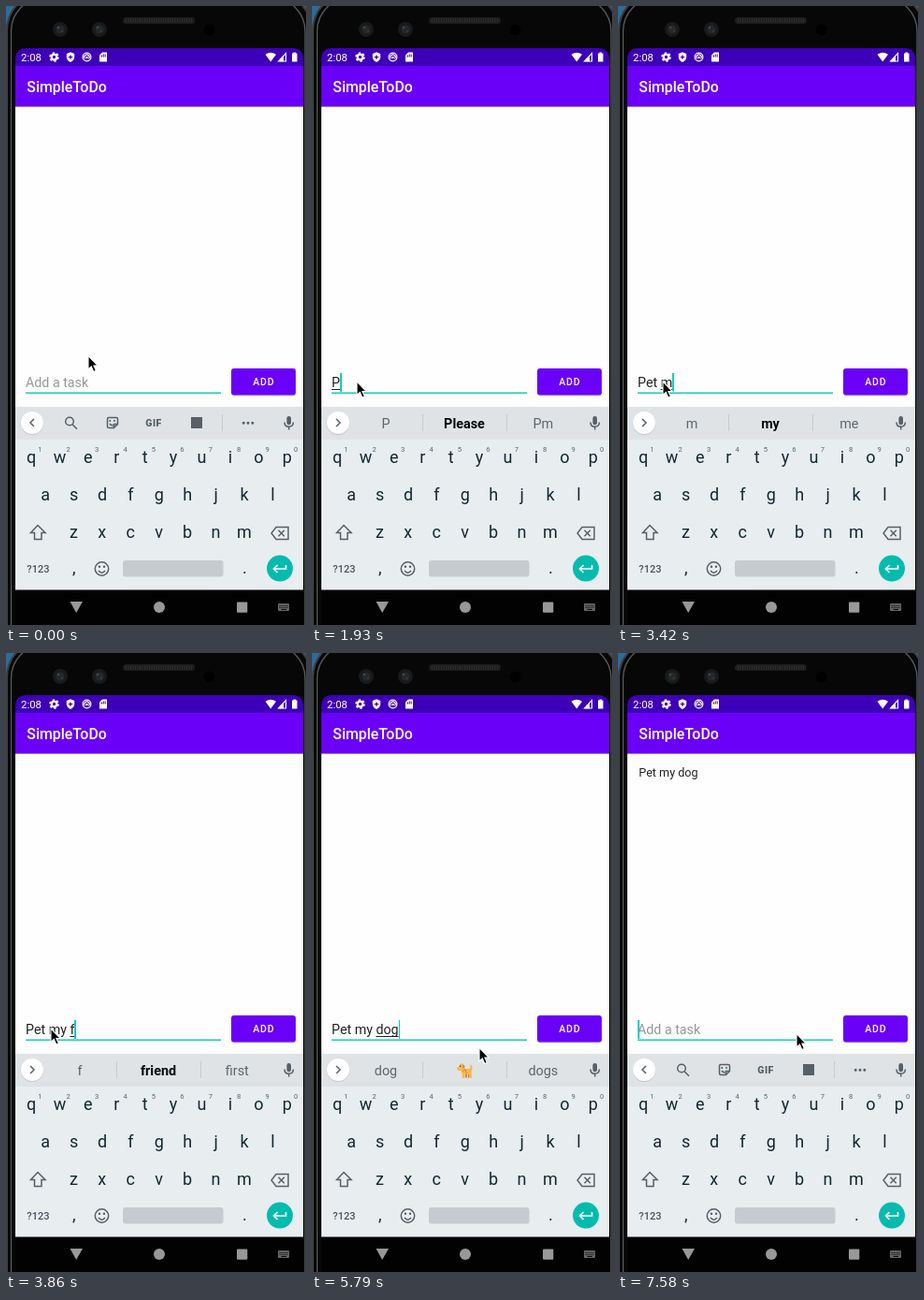
An HTML page that plays this animation: 321x661 px, repeating every 8000 ms.

```html
<!DOCTYPE html>
<html lang="en">
<head>
<meta charset="utf-8">
<title>To-do list demo</title>
<style>
html, body { margin: 0; width: 100%; height: 100%; overflow: hidden; background: #070707; }
#stage { position: absolute; left: 0; top: 0; width: 321px; height: 661px; overflow: hidden; font-family: Roboto, sans-serif; }
svg { position: absolute; left: 0; top: 0; }
.mid { text-anchor: middle; }
.key { font-size: 18px; fill: #12292f; }
.num { font-size: 7.6px; fill: #58646a; }
.tip { font-size: 14.4px; fill: #5d666b; }
.line { fill: none; stroke: #566066; stroke-width: 1.5; }
.solid { fill: #566066; }
.field { position: absolute; left: 21px; top: 394px; font-size: 14.25px; line-height: 16px; white-space: pre; color: #222; }
#hint { color: #979797; }
#word { text-decoration: underline 1px; text-underline-offset: 1.6px; text-decoration-skip-ink: none; }
#caret { position: absolute; top: -2px; width: 1.8px; height: 19.5px; background: #10cdbc; }
</style>
</head>
<body>
<div id="stage">
<svg width="321" height="661">
  <!-- phone body -->
  <rect width="14" height="30" fill="#2b6d98"/>
  <rect x="305" width="16" height="30" fill="#555a5d"/>
  <rect x="1" y="-14" width="326" height="720" rx="40" fill="#070707" stroke="#3d3e3f" stroke-width="2"/>
  <rect x="5.5" y="-9" width="314.500" height="720" rx="36" fill="none" stroke="#58595a" stroke-width="1.300"/>
  <rect x="125" y="12" width="77" height="7" rx="3.500" fill="#1d1d1d"/>
  <path d="M128 15.500H199" stroke="#303030" stroke-width="4" stroke-dasharray="1 1.500"/>
  <g id="lenses"></g>
  <circle cx="217.500" cy="25.500" r="6" fill="#000"/>

  <!-- app -->
  <path d="M10 64.500V57Q10 45 22 45H306Q318 45 318 57V64.500Z" fill="#3d00b8"/>
  <rect x="10" y="64" width="308" height="43.500" fill="#6a00f8"/>
  <rect x="10" y="107.500" width="308" height="320.500" fill="#fefefe"/>
  <g fill="#fff">
    <text x="16" y="58.800" font-size="11.400">2:08</text>
    <text x="22.300" y="92" font-size="15.900" font-weight="500">SimpleToDo</text>
    <g fill="none" stroke="#fff">
      <circle cx="51.500" cy="54.500" r="2.800" stroke-width="2.200"/>
      <circle cx="51.500" cy="54.500" r="4.500" stroke-width="1.600" stroke-dasharray="2.350 2.350"/>
      <circle cx="86.500" cy="54.500" r="4.400" stroke-width="1.200"/>
      <path d="M84.500 56.500A2.700 2.700 0 1 1 88.500 56.500" stroke-width="1.100"/>
    </g>
    <circle cx="86.500" cy="55" r="1.200"/>
    <path d="M69 49.200L73.200 51V54.500Q73 58 69 60Q65 58 64.800 54.500V51Z"/>
    <path d="M69 51.800L70 54L72 54.500L70 55.300L69 57.500L68 55.300L66 54.500L68 54Z" fill="#3d00b8"/>
    <path d="M103 49.500H108V59.500H100V52.500Z"/>
    <path d="M102.500 52.500V54.500M104.300 51.500V54.500M106.200 51.500V54.500" stroke="#3d00b8"/>
    <path d="M277.500 51.800Q283.200 47.600 289 51.800L283.200 59.500Z"/>
    <path d="M299.500 50.500V59H291.500Z" fill="none" stroke="#fff" stroke-width="1.100"/>
    <path d="M297 53V59.200H291.200Z"/>
    <path d="M306 50.500H307.500V49.500H310V50.500H311.500V59.500H306Z"/>
  </g>
  <text id="item" x="22.300" y="131.600" font-size="12.600" fill="#222">Pet my dog</text>
  <path d="M21 413.250H230" stroke="#18c9bc" stroke-width="1.500"/>
  <rect x="241" y="388" width="69" height="28.500" rx="3" fill="#000" opacity=".18"/>
  <rect id="button" x="241" y="387" width="69" height="28.500" rx="3"/>
  <text class="mid" x="275.900" y="405.200" font-size="10.500" font-weight="500" letter-spacing=".94" fill="#fff">ADD</text>

  <!-- keyboard -->
  <rect x="10" y="428" width="308" height="196" fill="#e8edf0"/>
  <rect x="10" y="428" width="308" height="35" fill="#dfe3e6"/>
  <circle cx="28" cy="445.800" r="12.300" fill="#000" opacity=".1"/>
  <circle cx="28" cy="445" r="12" fill="#fff"/>
  <path id="chevron" class="line" d="M30 441L26 445L30 449"/>
  <g id="tools">
    <circle class="line" cx="68" cy="443.500" r="4.300"/>
    <path class="line" d="M71 446.800L76 451.800"/>
    <path class="line" d="M110 439.500H118Q119.500 439.500 119.500 441V446.500L115.500 450.500H110Q108.500 450.500 108.500 449V441Q108.500 439.500 110 439.500M115.500 450V446.500H119M111 446Q112.500 448.300 114.500 447.500"/>
    <path class="line" d="M111.300 442V444M116 442V444"/>
    <text class="mid solid" x="158" y="449" font-size="10.500" font-weight="900" letter-spacing=".4">GIF</text>
    <rect class="solid" x="198" y="439" width="12" height="12"/>
    <path d="M231.500 436V454" stroke="#c6cbce"/>
    <path d="M254.200 445.300H265" stroke="#566066" stroke-width="3" stroke-linecap="round" stroke-dasharray="0 4.800"/>
  </g>
  <g id="tips">
    <path d="M118.500 436V454M208.500 436V454" stroke="#c6cbce"/>
    <text class="tip mid" x="79" y="451"></text>
    <text class="tip mid" x="163" y="451" style="fill:#080808;font-weight:700"></text>
    <text class="tip mid" x="247.300" y="451"></text>
    <g id="dog">
      <path d="M155 443L157.500 441L158.500 438.500H161.500L163 440.500V444H168.500Q170 442.500 169.500 439.500L171.300 440.500Q172 444 170.700 446V454H168.300V450H163.500V454H160.800V450L159.500 446H156Z" fill="#f6b850"/>
      <path d="M161 439.500L163.300 440.500V443.500L161.500 443ZM164 450H165.800V453.500H164ZM166.800 450H168.300V453.500H166.800Z" fill="#c98a3a"/>
      <path d="M161 447L164 444.500L165.500 449.500" fill="none" stroke="#dd7a44"/>
      <circle cx="158.700" cy="441.300" r=".7" fill="#36271f"/>
    </g>
  </g>
  <rect class="solid" x="300.400" y="438" width="4.600" height="9.200" rx="2.300"/>
  <path class="line" d="M298 444.500Q298 449.300 302.700 449.300T307.400 444.500M302.700 449V452.500"/>

  <g id="keys"></g>
  <path class="line" d="M34 554.500L42 562.500H38V569.500H30.500V562.500H26.500Z"/>
  <path class="line" d="M289 556.500H302V569.500H289L284 563ZM291.500 559.800L297.800 566.200M297.800 559.800L291.500 566.200"/>
  <text class="mid" x="34.400" y="604.800" font-size="11" font-weight="500" fill="#46545a">?123</text>
  <circle class="line" cx="102.500" cy="601" r="7.200"/>
  <path class="line" d="M99 603Q102.500 607.400 106 603"/>
  <circle class="solid" cx="100" cy="598.800" r="1.200"/>
  <circle class="solid" cx="105" cy="598.800" r="1.200"/>
  <rect x="125" y="592" width="107.500" height="17.500" rx="3" fill="#c6cbcf"/>
  <circle cx="293" cy="600.600" r="14" fill="#04bbae"/>
  <path d="M299.500 597V601H287M290.500 597L286.500 601L290.500 605" fill="none" stroke="#fff" stroke-width="1.700"/>

  <!-- navigation bar -->
  <rect x="10" y="623.500" width="308" height="37.500" fill="#020202"/>
  <g fill="#989898">
    <path d="M68.500 636H82L75.200 648Z"/>
    <circle cx="164" cy="642" r="6"/>
    <rect x="247" y="636.500" width="11.300" height="11.300" rx="1"/>
    <rect x="291" y="638" width="12" height="8" rx="1" fill="#666"/>
  </g>
  <path d="M292.500 640.300H302M292.500 642.300H302" stroke="#020202" stroke-dasharray="1.200 1"/>
  <path d="M294.500 644.400H300" stroke="#020202"/>
</svg>

<div id="hint" class="field">Add a task</div>
<div class="field"><span id="done"></span><span id="word"></span><i id="caret"></i></div>

<svg width="321" height="661">
  <path id="mouse" d="M0 0V14.500L3.300 11.500L5.700 17L8.300 15.900L5.900 10.500H10.300Z" fill="#000" stroke="#fff" stroke-width="1.100"/>
</svg>
</div>

<script>
const $ = id => document.getElementById(id);
const LOOP = 8000;

$('lenses').innerHTML = [58, 100].map(x =>
  `<circle cx="${x}" cy="25" r="8" fill="#191a1b"/><circle cx="${x}" cy="25" r="4.500" fill="#25282a"/>
   <circle cx="${x - 2}" cy="23" r="1.300" fill="#42474a"/><circle cx="${x + 2}" cy="27" r="1" fill="#393e41"/>`).join('');

const label = (cls, x, y, s) => `<text class="${cls} mid" x="${x}" y="${y}">${s}</text>`;
const row = (chars, x, y) => [...chars].map((c, i) => label('key', x + i * 30.42, y, c)).join('');
$('keys').innerHTML = row('qwertyuiop', 27, 488) + row('asdfghjkl', 42.2, 528) + row('zxcvbnm', 72.4, 567.8)
  + [...'1234567890'].map((c, i) => label('num', 36.3 + i * 30.42, 476, c)).join('')
  + label('key', 72.8, 605.5, ',') + label('key', 255.3, 605.5, '.');

// Each step overrides part of the state; "|" starts the underlined word.
const typed = (text, tips) => ({ text, tips, caret: 1 });
const at = (x, y, more) => ({ mouse: [x, y], ...more });
const steps = [
  [0, at(88, 373.5, { text: '', tips: '', caret: 0, item: 0, press: 0 })],
  [440, at(81, 392)],
  [590, at(65, 426, { caret: 1 })],
  [740, at(54, 410.5)],
  [890, at(50, 404)],
  [1040, at(48, 401, { caret: 0 })],
  [1490, { caret: 1 }],
  [1930, typed('|P', 'P Please Pm')],
  [2080, typed('|Pe', 'Pe Pet People')],
  [2670, { caret: 0 }],
  [2970, typed('|Pet', 'Pet Pets Petty')],
  [3120, typed('Pet ', 'the my and')],
  [3420, typed('Pet |m', 'm my me')],
  [3560, typed('Pet |my', 'my mine mythology')],
  [3860, typed('Pet my |f', 'f friend first')],
  [4160, typed('Pet my ', 'friend dad mom')],
  [4300, typed('Pet |my', 'my mine mythology')],
  [4450, typed('Pet my |d', 'd dad day')],
  [4900, { caret: 0 }],
  [5350, typed('Pet my |do', 'do dog door')],
  [5500, typed('Pet my |dog', 'dog * dogs')],
  [5790, at(179, 421.5)],
  [5940, at(225, 412)],
  [6090, at(253, 404, { caret: 0 })],
  [6240, at(261, 402)],
  [6530, { text: '', caret: 1, press: 1 }],
  [6680, { item: .4 }],
  [6830, { item: 1, press: 0 }],
  [6980, at(239, 404, { tips: '' })],
  [7130, at(202, 406.5, { caret: 0 })],
  [7280, at(191, 406.5)],
  [7580, { caret: 1 }]
];

const slots = document.querySelectorAll('#tips text');
const visible = (id, on) => $(id).style.visibility = on ? 'inherit' : 'hidden';
let last = -1;

function show(t) {
  const past = steps.filter(([start]) => start <= t);
  if (past.length === last) return;
  last = past.length;
  const s = Object.assign({}, ...past.map(([, change]) => change));
  const [done, word = ''] = s.text.split('|');
  $('done').textContent = done;
  $('word').textContent = word;
  visible('hint', !s.text);
  visible('caret', s.caret);
  visible('tools', !s.tips);
  visible('tips', s.tips);
  const tips = s.tips.split(' ');
  slots.forEach((el, i) => el.textContent = tips[i] === '*' ? '' : tips[i] || '');
  visible('dog', tips[1] === '*');
  $('chevron').setAttribute('d', s.tips ? 'M26 441L30 445L26 449' : 'M30 441L26 445L30 449');
  $('item').style.opacity = s.item;
  $('button').style.fill = s.press ? '#8d20fb' : '#6a00f8';
  $('mouse').setAttribute('transform', `translate(${s.mouse})`);
}

const begin = performance.now();
function tick() {
  show((performance.now() - begin) % LOOP);
  requestAnimationFrame(tick);
}
tick();
</script>
</body>
</html>
```
